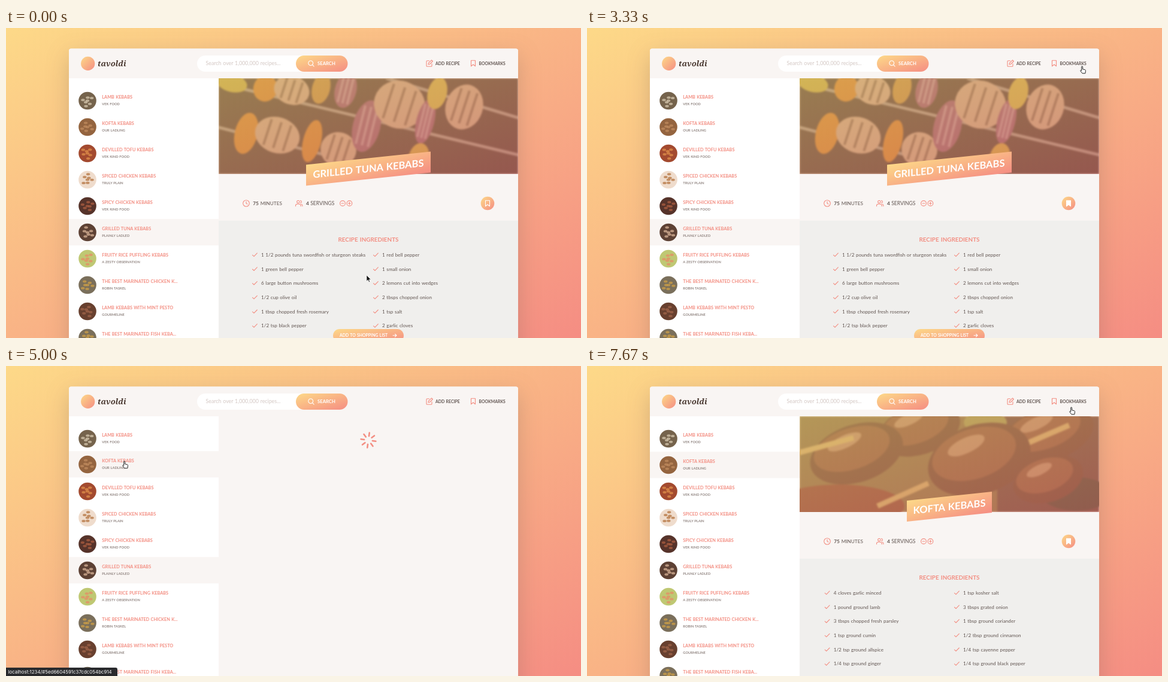
Write an HTML page that moves like this. It is 960 px wide and 518 px high and loops after 8 s.

```html
<!DOCTYPE html>
<html lang="en">
<head>
<meta charset="utf-8">
<style>
  html, body { margin: 0; width: 100%; height: 100%; overflow: hidden; }
  svg { display: block; }
  text { font-family: Lato, "Open Sans", sans-serif; word-spacing: .07em; white-space: pre; }
  .b { font-weight: 700; }
  .line { fill: none; stroke: #f38e82; stroke-width: 1.1; stroke-linecap: round; stroke-linejoin: round; }
  .w { stroke: #fff; }
  .logo { font: italic 700 13px "Noto Serif", serif; }
  .url { font-family: Inter, Roboto, sans-serif; }
  .shadow { filter: drop-shadow(0 12px 18px #61555140); }
  .menu { filter: drop-shadow(0 3px 9px #61555126); }
  .soft { filter: blur(1.4px); }
</style>
</head>
<body>
<svg id="stage" width="100%" height="100%" viewBox="0 0 960 518"></svg>
<script>
const CORAL = '#f38e82', DARK = '#615551', GREY = '#918581', PALE = '#f9f5f3';
const stage = document.getElementById('stage');

// y is the middle of the capitals
const text = (x, y, s, size, fill = DARK, attrs = '') =>
  `<text x="${x}" y="${y + size * .36}" font-size="${size}" fill="${fill}" ${attrs}>${s}</text>`;
const bold = (x, y, s, size, fill, attrs = '') => text(x, y, s, size, fill, `class="b" ${attrs}`);
const rect = (x, y, w, h, fill, attrs = '') =>
  `<rect x="${x}" y="${y}" width="${w}" height="${h}" fill="${fill}" ${attrs}/>`;
const disc = (x, y, r, fill) => `<circle cx="${x}" cy="${y}" r="${r}" fill="${fill}"/>`;
const icon = (x, y, d, cls = '', attrs = '') =>
  `<path class="line ${cls}" transform="translate(${x} ${y})" d="${d}" ${attrs}/>`;
const group = (id, body, attrs = '') => `<g id="${id}" ${attrs}>${body}</g>`;
const ring = r => `M${-r} 0a${r} ${r} 0 1 1 ${2 * r} 0a${r} ${r} 0 1 1 ${-2 * r} 0`;
const FLAG = 'M-3.5-4.8h7v9.6l-3.5-2.8-3.5 2.8z';

const results = [
  ['LAMB KEBABS', 'VEK FOOD', '#75634c', '#d0c1a8'],
  ['KOFTA KEBABS', 'OUR LADLING', '#94643f', '#bd885c'],
  ['DEVILLED TOFU KEBABS', 'VEK KIND FOOD', '#a34a2f', '#db8a48'],
  ['SPICED CHICKEN KEBABS', 'TRULY PLAIN', '#efdccc', '#b87a48'],
  ['SPICY CHICKEN KEBABS', 'VEK KIND FOOD', '#56332a', '#a55a3e'],
  ['GRILLED TUNA KEBABS', 'PLAINLY LADLED', '#5d4134', '#cfaa90'],
  ['FRUITY RICE PUFFLING KEBABS', 'A ZESTY OBSERVATION', '#bfc873', '#e39066'],
  ['THE BEST MARINATED CHICKEN K...', 'ROBIN TASKEL', '#7a6f5b', '#c89c48'],
  ['LAMB KEBABS WITH MINT PESTO', 'GOURMELINE', '#68402f', '#9c6248'],
  ['THE BEST MARINATED FISH KEBA...', 'ROBIN TASKEL', '#7a6f5b', '#c89c48']
];

function preview(i, x, y) {
  const [title, by, base, spot] = results[i];
  let s = disc(x, y, 14.8, base);
  for (let n = 0; n < 7; n++) {
    const a = n * 2.4 + i, r = 3.8 * Math.sqrt(n);
    s += `<ellipse cx="${x + r * Math.cos(a)}" cy="${y + r * Math.sin(a)}" rx="3.2" ry="2" fill="${spot}" opacity=".8"/>`;
  }
  return s + bold(x + 24.3, y - 5.8, title, 7.3, CORAL) + bold(x + 24.3, y + 5.8, by, 5.7, GREY);
}

const list = results.map((_, i) => group('row' + i,
  rect(105, 99.3 + 44 * i, 250, 44, PALE, `id="bg${i}" opacity="0"`) + preview(i, 136, 121.5 + 44 * i))).join('');

const header =
  `<path d="M105 84V38.5q0-4 4-4H851q4 0 4 4V84z" fill="${PALE}"/>` +
  disc(136.7, 59.4, 11.6, 'url(#g)') +
  '<text class="logo" x="153" y="64" fill="#48372f">tavoldi</text>' +
  rect(319, 46, 251, 27, '#fff', 'rx="13.5"') +
  text(333.5, 59.3, 'Search over 1,000,000 recipes...', 8.8, '#d3c7c3') +
  rect(484, 46, 86.5, 27, 'url(#g)', 'rx="13.5"') +
  icon(508.7, 58.7, ring(3.9) + 'M2.9 2.9L5.4 5.4', 'w') +
  bold(520, 59.3, 'SEARCH', 7.7, '#fff') +
  group('hover', rect(767, 34.5, 76, 49.5, 'url(#shade)')) +
  icon(707, 59, 'M-.5-4.2H-4q-1 0-1 1V4.2q0 1 1 1H3q1 0 1-1V.8M-2 2L-1.5-.5 3.5-5.4 5.4-3.5.5 1.5z') +
  bold(717, 59.3, 'ADD RECIPE', 6.95) +
  icon(780, 59, FLAG) +
  bold(789.5, 59.3, 'BOOKMARKS', 6.85);

// photo stand-ins, in a 500 x 160 box
const blob = (x, y, rx, ry, turn, fill, mark = '') =>
  `<g transform="translate(${x} ${y}) rotate(${turn})"><ellipse rx="${rx}" ry="${ry}" fill="${fill}"/>` +
  (mark && [-.45, 0, .45].map(p =>
    `<path d="M${p * rx} ${-ry * .75}V${ry * .75}" stroke="${mark}" stroke-width="4" opacity=".65"/>`).join('')) + '</g>';
const tuna = (x, y, rx, ry) => blob(x, y, rx, ry, 18, '#b18c70', '#4a2e20');
const onion = (x, y, rx, ry) => blob(x, y, rx, ry, 14, '#7b3a58', '#b58a98');
const pepper = (x, y, rx, ry, fill = '#b9660f') => blob(x, y, rx, ry, 14, fill);

const grill = rect(0, 0, 500, 160, '#35221a') +
  '<path d="M0 8L500 128M0 82L320 165M280 0L500 66" stroke="#8d7d70" stroke-width="5"/>' +
  pepper(22, 8, 26, 15, '#a89024') + pepper(78, 17, 20, 22) + tuna(122, 20, 30, 24) +
  pepper(171, 17, 15, 26, '#a87522') + onion(212, 20, 18, 30) +
  pepper(46, 92, 19, 35) + tuna(98, 95, 38, 30) + pepper(156, 105, 15, 36) + tuna(200, 119, 30, 29) +
  onion(247, 80, 23, 44) + tuna(302, 44, 43, 40) + onion(345, 72, 15, 38) +
  pepper(365, 25, 16, 27, '#b49a2a') + tuna(410, 48, 31, 38) + pepper(334, 133, 17, 25, '#b88b22');

const ball = (x, y, rx, ry) => blob(x, y, rx, ry, -18, '#4c2816') +
  blob(x - rx * .1, y - ry * .16, rx * .82, ry * .72, -18, '#6e3c20') +
  blob(x - rx * .25, y - ry * .4, rx * .38, ry * .22, -25, '#a17450');
const kofta = rect(0, 0, 500, 160, '#6b5528') + rect(330, 0, 170, 160, '#4a2b20') +
  blob(65, 150, 110, 36, 0, '#6d2a17') + blob(310, 10, 36, 18, 0, '#848435') + blob(462, 130, 58, 28, 0, '#2c2a18') +
  ball(200, 22, 70, 42) + ball(415, 30, 78, 45) + ball(95, 62, 80, 48) +
  '<path d="M-5 62L90 36M130 150L215 112M345 60L450 15" stroke="#b99a50" stroke-width="9"/>' +
  ball(300, 72, 88, 58) + ball(415, 105, 60, 38);

const hero = art => `<svg x="355" y="84" width="500" height="160"><g class="soft">${art}</g>` +
  rect(0, 0, 500, 160, 'url(#g)', 'opacity=".5"') + '</svg>';

function recipe(id, art, name, width, left, right, x) {
  const column = (items, x) => items.map((s, i) => {
    const y = 379 + 23.7 * i;
    return icon(x - 10.5, y, 'M-4 .3L-1.5 2.6 3.8-2.8') + text(x, y, s, 8.15);
  }).join('');
  return group(id, hero(art) +
    `<g transform="translate(605 235) skewY(-6)">${rect(-width / 2, -17.5, width, 35, 'url(#g)')}` +
    bold(0, 0, name, 16.5, '#fff', 'text-anchor="middle"') + '</g>' +
    icon(401, 293, ring(5.3) + 'M0-3V0L2 1.2') +
    bold(412.3, 293.2, '75', 8.3) + text(424.7, 293.2, 'MINUTES', 8.2) +
    icon(489, 293, 'M-5.5 4.8V3.8q0-2.6 2.6-2.6H.6q2.6 0 2.6 2.6v1M-3.3-2.6a2.2 2.2 0 1 1 4.4 0a2.2 2.2 0 1 1-4.4 0M2.6-4.6q1.7.5 1.7 2.1T2.6-.5M4.3 1.4q1.6.5 1.6 2.4v1') +
    bold(501, 293.2, '4', 8.3) + text(508.2, 293.2, 'SERVINGS', 8.5) +
    icon(562, 293, ring(4.4) + 'M-2 0H2') + icon(573.4, 293, ring(4.4) + 'M-2 0H2M0-2V2') +
    disc(804, 293, 11.3, 'url(#g)') + icon(804, 293, FLAG, 'w flag') +
    rect(355, 322, 500, 196, '#f0efed') +
    bold(605, 353.5, 'RECIPE INGREDIENTS', 9.9, CORAL, 'text-anchor="middle"') +
    column(left, x) + column(right, 628));
}

const recipes =
  recipe('tuna', grill, 'GRILLED TUNA KEBABS', 208,
    ['1 1/2 pounds tuna swordfish or sturgeon steaks', '1 green bell pepper', '6 large button mushrooms',
      '1/2 cup olive oil', '1 tbsp chopped fresh rosemary', '1/2 tsp black pepper'],
    ['1 red bell pepper', '1 small onion', '2 lemons cut into wedges',
      '2 tbsps chopped onion', '1 tsp salt', '2 garlic cloves'], 426) +
  group('add', rect(546, 503, 118, 22, 'url(#g)', 'rx="11"') +
    bold(557, 513.5, 'ADD TO SHOPPING LIST', 6.9, '#fff') + icon(649, 513.7, 'M-3 0H3M.6-2.4L3 0 .6 2.4', 'w')) +
  recipe('kofta', kofta, 'KOFTA KEBABS', 142,
    ['4 cloves garlic minced', '1 pound ground lamb', '3 tbsps chopped fresh parsley',
      '1 tsp ground cumin', '1/2 tsp ground allspice', '1/4 tsp ground ginger'],
    ['1 tsp kosher salt', '3 tbsps grated onion', '1 tbsp ground coriander',
      '1/2 tbsp ground cinnamon', '1/4 tsp cayenne pepper', '1/4 tsp ground black pepper'], 411.7);

let rays = '';
for (let i = 0; i < 8; i++) rays += `<path d="M0-7V-12.5" transform="rotate(${i * 45 + 8})"/>`;

stage.innerHTML = `<defs>
  <linearGradient id="g" x2="1" y2="1"><stop stop-color="#fdd988"/><stop offset="1" stop-color="#f58d83"/></linearGradient>
  <linearGradient id="shade" x2="0" y2="1"><stop offset=".35" stop-color="#f4f1ef"/><stop offset="1" stop-color="#dedbd8"/></linearGradient>
</defs>` +
  rect(0, 0, 960, 518, 'url(#g)') +
  rect(105, 34.5, 750, 520, PALE, 'rx="4" class="shadow"') +
  header + rect(105, 84, 250, 434, '#fff') + list + recipes +
  group('spinner', rays, `class="line" style="stroke-width:2.6" transform="translate(605 124)"`) +
  group('empty', rect(655, 84, 200, 77.7, '#fff', 'class="menu"') +
    icon(682, 120.5, 'M0-5.8L6.8 5.8H-6.8zM0-1.5V1.8M0 3.7V3.8') + bold(697.5, 120.8, 'No bookmarks yet :(', 9)) +
  group('saved', rect(655, 84, 200, 55, '#fff', 'class="menu"') + preview(5, 686, 111.5)) +
  group('url', '<path d="M0 504H183q3 0 3 3V518H0z" fill="#292a2d"/>' +
    '<text class="url" x="3.5" y="514" font-size="7.9" fill="#fff">localhost:1234/#5ed6604591c37cdc054bc914</text>') +
  '<path id="arrow" d="M0 0V10.2L2.4 8 4 11.6 5.6 10.9 4.1 7.4H7.2z" fill="#111" stroke="#fff" stroke-width=".7"/>' +
  `<path id="hand" d="M-2.4-5c0-1.4 2-1.4 2 0V-1.2l3.6.8c.9.2 1.4.8 1.3 1.7l-.6 4.5H-1L-4 2c-.8-1 .3-1.9 1.2-1.2l.6.5z" fill="#fff" stroke="#222" stroke-width="1" stroke-linejoin="round"/>`;

const el = id => document.getElementById(id);
const show = (id, v) => el(id).setAttribute('opacity', +v);

// [step, x, y, hand]
const moves = [
  [0, 602, 413, 0], [4, 828, 75, 1], [7, 812, 262, 0], [8, 804, 293, 1], [10, 828, 70, 1],
  [12, 800, 112, 1], [13, 382, 329, 0], [14, 199, 165, 1], [19, 430, 240, 0],
  [20, 640, 280, 0], [21, 804, 293, 1], [23, 810, 75, 1]
];
const emptyFade = { 4: 1, 5: 1, 6: 1, 7: .9, 8: .3 };
const savedFade = { 11: 1, 12: 1, 13: .6 };

const LOOP = 8000, STEPS = 24;
function frame(now) {
  const k = Math.floor((now % LOOP + 5) * STEPS / LOOP) % STEPS;
  const [, x, y, hand] = moves.filter(m => m[0] <= k).pop();
  for (const id of ['arrow', 'hand']) {
    show(id, (id === 'hand') == hand);
    el(id).setAttribute('transform', `translate(${x} ${y})`);
  }
  const empty = emptyFade[k] || 0, saved = savedFade[k] || 0;
  show('empty', empty);
  show('saved', saved);
  show('hover', empty || saved * saved);
  show('tuna', k < 15);
  show('add', k < 15);
  show('spinner', k === 15 || k === 16);
  show('kofta', k > 16);
  show('bg1', k > 13);
  show('bg5', k < 16);
  show('url', k > 14 && k < 18 ? 1 : k === 18 ? .5 : 0);
  el('row1').setAttribute('transform', `translate(0 ${k > 13 && k < 19 ? -1 : 0})`);
  const marked = k > 16 ? k > 21 : k > 8;
  for (const f of document.querySelectorAll('.flag')) f.style.fill = marked ? '#fff' : 'none';
  requestAnimationFrame(frame);
}
frame(0);
</script>
</body>
</html>
```
